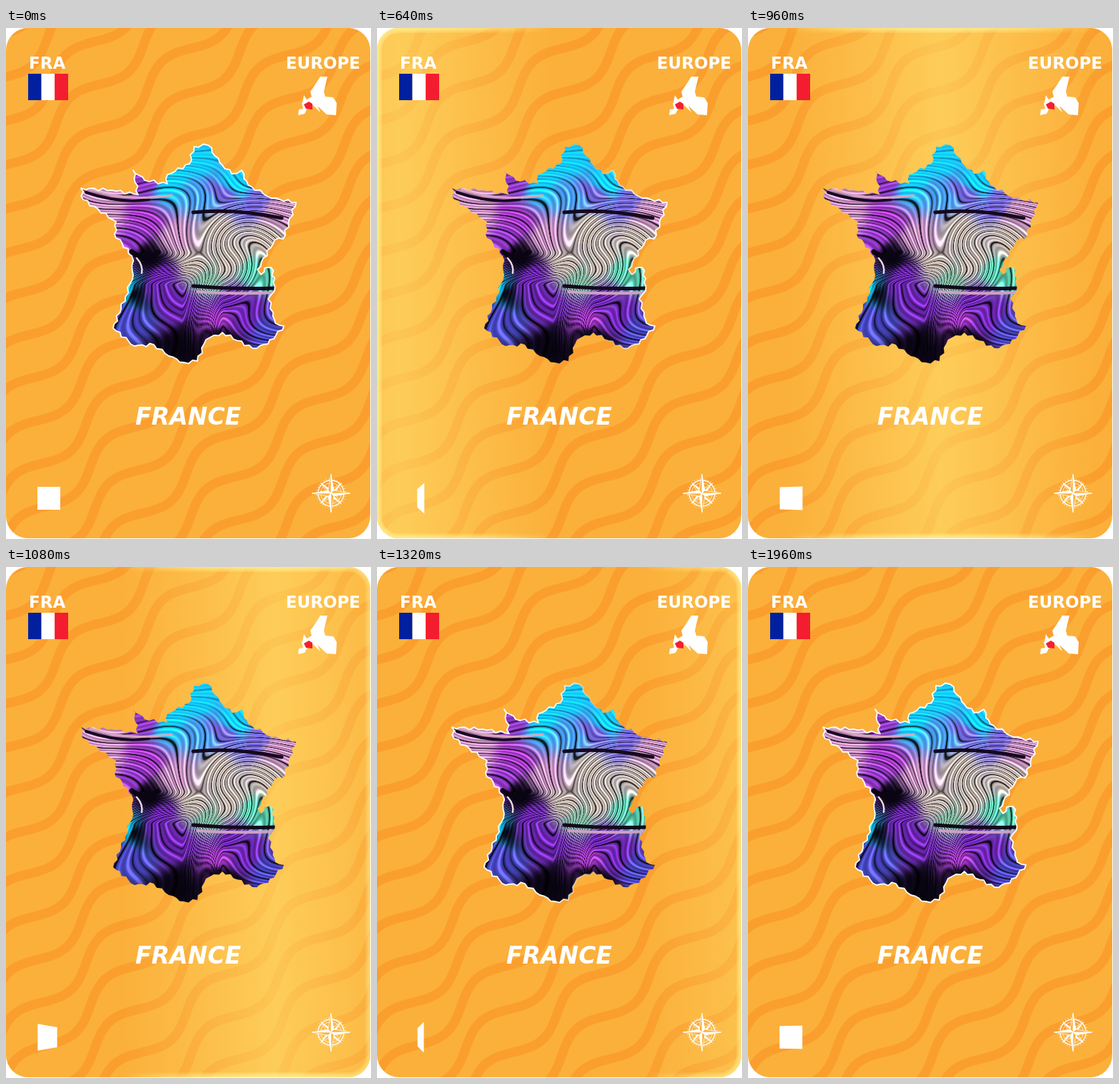
An HTML page with a canvas that plays this animation: 511x715 px, repeating every 2 s.

```html
<!DOCTYPE html>
<html lang="en">
<head>
<meta charset="utf-8">
<title>France card</title>
<style>
  html, body { margin: 0; width: 100%; height: 100%; overflow: hidden; background: #fff; }
  canvas, svg { position: absolute; left: 0; top: 0; width: 511px; height: 715px; }
  text { font: bold 23px "DejaVu Sans", sans-serif; fill: #fff; }
  .name { font-size: 33px; font-style: italic; }
  #mark { position: absolute; left: 44px; top: 642px; width: 32px; height: 32px; background: #fff; }
</style>
</head>
<body>
<canvas id="card" width="511" height="715"></canvas>
<svg viewBox="0 0 511 715">
  <text x="32" y="57">FRA</text>
  <text x="496" y="57" text-anchor="end">EUROPE</text>
  <text class="name" x="255" y="555" text-anchor="middle">FRANCE</text>
  <path fill="#00209f" d="M31 64h18.6v37H31z"/>
  <path fill="#fff" d="M49.6 64h18.6v37H49.6z"/>
  <path fill="#f31d2f" d="M68.2 64H87v37H68.2z"/>
  <path fill="#fff" d="M428 96l-2-7 7-10 7-11 10 0-5 21 2 7 11 1 5 8-1 17-13-1-13-12 4 9-10-10-9 6-3 6-9 2 1-8 6-1-2-8zM417 94l6 9-8 2z"/>
  <path fill="#f3202f" d="M417 107l7-4 5 3v8l-9-1z"/>
  <g id="rose" fill="none" stroke="#fff" transform="translate(455 651)">
    <circle r="18" stroke-width="1.3"/>
    <circle r="14.5" stroke-width=".7"/>
    <circle r="20" stroke-width="2" stroke-dasharray=".7 3.23" opacity=".8"/>
  </g>
</svg>
<div id="mark"></div>
<script>
const W = 511, H = 715, LOOP = 2000, STEP = 40;
const ctx = document.getElementById('card').getContext('2d');
const mark = document.getElementById('mark');

const coast = `263 166 283 164 299 188 316 204 330 199 333 211 344 222 372 238 406 244
  388 295 376 297 352 338 357 345 362 336 371 335 376 350 376 368 367 379 374 398
  377 413 389 417 367 442 345 448 303 426 280 436 268 466 249 468 228 459 207 443
  180 445 150 420 167 376 178 345 176 319 152 288 154 271 108 240 105 224 148 227
  185 233 178 199 194 213 226 218 226 205 257 190`.trim().split(/\s+/).map(Number);

// Long stretches of coast get a small ragged edge.
function outline(pts) {
  const path = new Path2D();
  for (let i = 0; i < pts.length; i += 2) {
    const x = pts[i], y = pts[i + 1];
    const dx = pts[(i + 2) % pts.length] - x, dy = pts[(i + 3) % pts.length] - y;
    const len = Math.hypot(dx, dy), n = Math.max(1, Math.round(len / 6));
    for (let k = 0; k < n; k++) {
      const off = k ? 2.2 * Math.sin(k * 2.4 + i) : 0;
      path.lineTo(x + dx * k / n - dy / len * off, y + dy * k / n + dx / len * off);
    }
  }
  path.closePath();
  return path;
}
const france = outline(coast);

const paint = {
  cyan: '#11ccff', sky: '#4499ee', iris: '#7060d8', violet: '#8833bb', grape: '#6622aa',
  plum: '#9933bb', mauve: '#c088b8', sand: '#b8aaa2', mint: '#55c8a8', moss: '#76ae96',
  blue: '#4440b8', ink: '#080410'
};
const rgbOf = hex => [1, 3, 5].map(i => parseInt(hex.slice(i, i + 2), 16));

// Places of each paint in the marbling
const spots = Object.entries({
  cyan: '265 188 235 212 322 211 170 368',
  sky: '272 236',
  iris: '302 230 345 242',
  violet: '190 214 178 298',
  plum: '190 272 300 404',
  mauve: '125 234 150 250 385 260 240 288',
  sand: '300 284 360 290 258 325 312 330',
  mint: '355 347',
  moss: '290 352',
  grape: '210 352 305 378 235 388 340 402',
  blue: '172 405 360 430',
  ink: '202 324 182 368 242 440 308 436'
}).flatMap(([name, places]) => places.match(/\d+ \d+/g).map(p => {
  const [x, y] = p.split(' ').map(Number);
  return { x, y, rgb: rgbOf(paint[name]) };
}));

const smooth = (a, b, v) => {
  const t = Math.min(1, Math.max(0, (v - a) / (b - a)));
  return t * t * (3 - 2 * t);
};

function layer(draw) {
  const c = document.createElement('canvas');
  c.width = W;
  c.height = H;
  draw(c.getContext('2d'));
  return c;
}

// Streaks curl round a centre on the right and fan out of a knot on the left.
function flow(x, y) {
  const dx = x - 315, dy = y - 318;
  const turn = 2.3 * Math.exp(-(dx * dx + dy * dy) / 3200);
  const c = Math.cos(turn), s = Math.sin(turn);
  const u = 315 + dx * c - dy * s, v = 318 + dx * s + dy * c;
  const drift = v - 0.3 * u + 15 * Math.sin(u / 36 + v / 31) + 7 * Math.sin(v / 16 - u / 43);
  const fan = 62 * Math.atan2(y - 312, x - 186) + 6 * Math.sin(y / 17 + x / 30);
  const w = smooth(312, 360, y) * (1 - smooth(245, 305, x));
  return drift * (1 - w) + fan * w;
}

function marbleColor(x, y) {
  const wx = x + 6 * Math.sin(y / 11 + x / 40), wy = y + 5 * Math.sin(x / 17 - y / 29);
  let sum = 0, rgb = [0, 0, 0];
  for (const p of spots) {
    const d = (wx - p.x) ** 2 + (wy - p.y) ** 2 + 30;
    const k = 1 / (d * d);
    sum += k;
    rgb = rgb.map((v, i) => v + p.rgb[i] * k);
  }
  const f = flow(x, y);
  const wave = 0.6 * Math.sin(f * 0.95) + 0.4 * Math.sin(f * 0.41 + x / 50);
  const calm = 0.35 + 0.65 * smooth(195, 240, y);
  const light = 1 + calm * (0.34 * wave - 0.5 * smooth(0.5, 0.9, -wave));
  const tint = 36 * calm * smooth(0.3, 0.9, wave);
  return rgb.map(v => v / sum * light + tint * Math.min(1, v / sum / 60));
}

const marble = layer(g => {
  const x0 = 100, y0 = 160, w = 312, h = 312;
  const img = g.createImageData(w, h);
  for (let y = 0, i = 0; y < h; y++)
    for (let x = 0; x < w; x++, i += 4)
      img.data.set([...marbleColor(x + x0, y + y0), 255], i);
  g.putImageData(img, x0, y0);
  const streak = (color, width, d) => {
    g.strokeStyle = color;
    g.lineWidth = width;
    g.stroke(new Path2D(d));
  };
  g.lineCap = 'round';
  streak('#15091f', 5, 'M262 258Q320 252 386 266');
  streak('#120a1c', 5, 'M262 361Q320 366 376 364');
  streak('#cf9fc5', 4, 'M268 369Q320 373 376 370');
  streak('#160a20', 4, 'M112 230Q160 246 200 240');
  streak('#d7a6c0', 3, 'M118 226Q170 244 232 234');
  streak('#0b0412', 7, 'M176 313Q195 328 212 314');
  streak('#ead9df', 2.5, 'M183 322Q192 332 190 343');
});

const ground = layer(g => {
  g.fillStyle = '#fbb03b';
  g.fillRect(0, 0, W, H);
  const a = 42 * Math.PI / 180, c = Math.cos(a), s = Math.sin(a);
  const line = new Path2D();
  for (let u = -900; u <= 900; u += 5) {
    const n = -14 * Math.sin(2 * Math.PI * u / 165);
    line.lineTo(88 + u * c + n * s, 314 - u * s + n * c);
  }
  g.strokeStyle = '#fa9f2e';
  g.lineWidth = 13;
  for (let k = -14; k <= 18; k++) {
    g.setTransform(1, 0, 0, 1, 6 * k, 60 * k);
    g.stroke(line);
  }
});

function drawRose() {
  const add = (d, deg, fill) => {
    const p = document.createElementNS('http://www.w3.org/2000/svg', 'path');
    p.setAttribute('d', d);
    p.setAttribute('transform', `rotate(${deg})`);
    p.setAttribute('fill', fill);
    p.setAttribute('stroke-width', '.7');
    document.getElementById('rose').append(p);
  };
  const point = (deg, r, b) => {
    add(`M0 0L${b} ${-b}L0 ${-r}Z`, deg, '#fff');
    add(`M0 0L${-b} ${-b}L0 ${-r}Z`, deg, '#fbb03b');
  };
  for (let i = 0; i < 4; i++) point(45 + 90 * i, 20, 3.5);
  for (let i = 0; i < 4; i++) point(90 * i, 26.5, 4);
}

// Time in ms, then the centre of the light or the turn of the mark
const shineX = [[0, -360], [320, -170], [640, 30], [960, 270], [1160, 450], [1320, 590], [2000, 1190]];
const spin = [[0, 0], [320, 36], [640, 107], [960, 174], [1160, 240], [1320, 285], [1960, 358], [2000, 360]];

function at(keys, t) {
  const i = Math.max(1, keys.findIndex(k => k[0] >= t));
  const [t0, v0] = keys[i - 1], [t1, v1] = keys[i];
  return v0 + (v1 - v0) * (t - t0) / (t1 - t0);
}

// Evenly spaced opacities of one colour across a vertical band
function beam(center, half, rgb, alphas) {
  const g = ctx.createLinearGradient(center - half, 0, center + half, 0);
  alphas.forEach((a, i) => g.addColorStop(i / (alphas.length - 1), `rgba(${rgb},${a})`));
  return g;
}

const edge = new Path2D();
edge.roundRect(0, 0, 510, 714, 31);

function render(t) {
  const x = at(shineX, t);
  ctx.clearRect(0, 0, W, H);

  ctx.save();
  ctx.clip(edge);
  ctx.drawImage(ground, 0, 0);
  ctx.fillStyle = beam(x, 215, '255,226,110', [0, 0.27, 0.58, 0.28, 0]);
  ctx.fillRect(0, 0, W, H);
  ctx.strokeStyle = beam(x, 215, '255,236,140', [0, 0.3, 0.5, 0.3, 0]);
  for (const w of [4, 8, 13]) {
    ctx.lineWidth = w;
    ctx.stroke(edge);
  }
  ctx.restore();

  ctx.save();
  ctx.clip(france);
  ctx.drawImage(marble, 0, 0);
  ctx.restore();

  // The white coastline fades out while the light is near.
  ctx.strokeStyle = beam(x, 345, '255,255,255', [1, 0, 0, 0, 0, 0, 0, 0, 0, 1]);
  ctx.lineWidth = 1.8;
  ctx.lineJoin = 'round';
  ctx.stroke(france);

  mark.style.transform = `perspective(60px) rotateY(${at(spin, t)}deg)`;
}

function tick(now) {
  render(Math.floor((now % LOOP) / STEP) * STEP);
  requestAnimationFrame(tick);
}

drawRose();
render(0);
requestAnimationFrame(tick);
</script>
</body>
</html>
```
